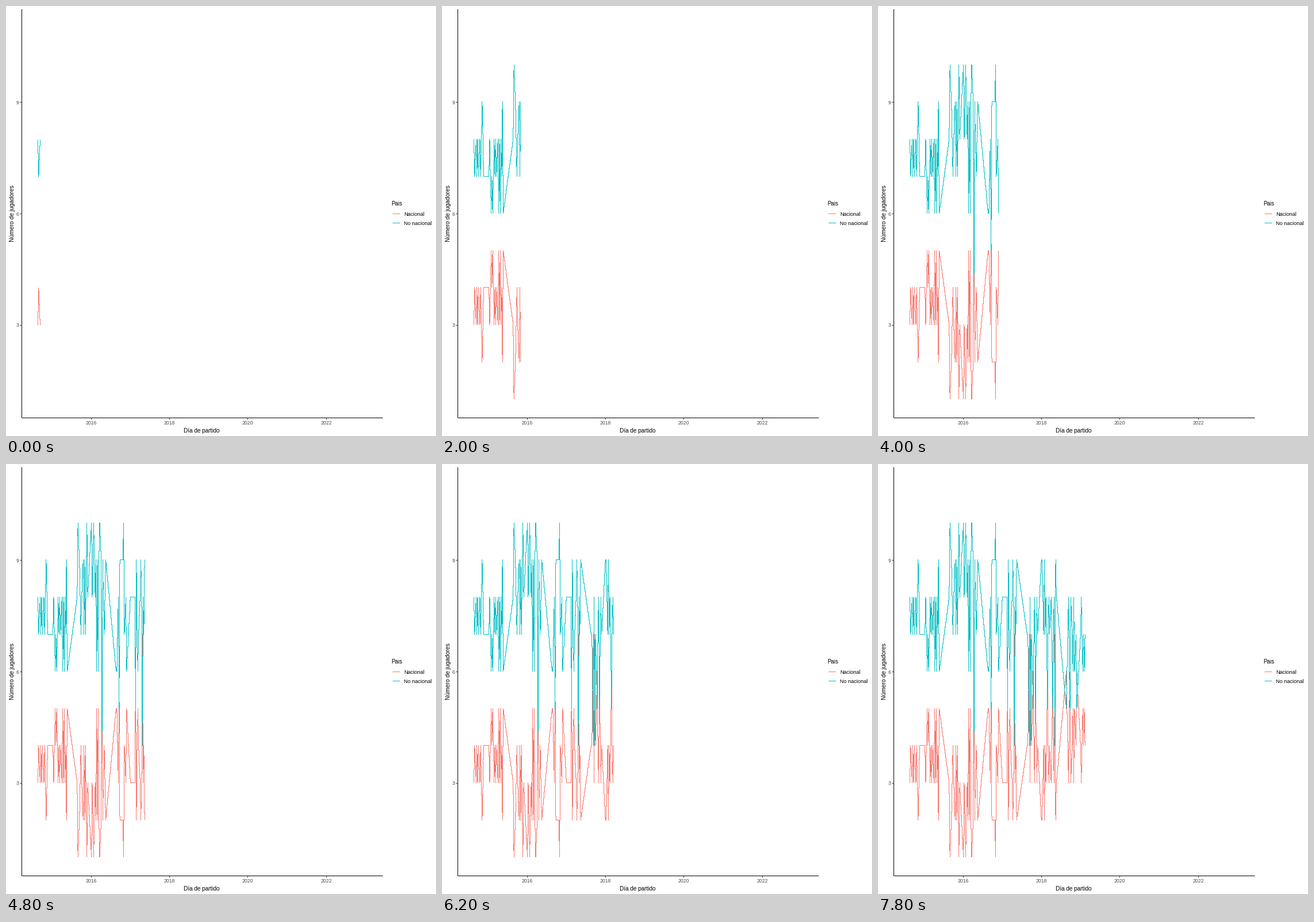
A matplotlib script for the animation above (8000 ms loop, 748 by 748 pixels).

```python
import numpy as np
import matplotlib.pyplot as plt
from matplotlib.animation import FuncAnimation

SIZE, DPI = 748, 100
PX = 72 / DPI                      # points per pixel
RED, TEAL, GREY = "#F8766D", "#00BFC4", "#4D4D4D"
WEEK = 68.15 / 52.18               # pixels per week
X0, STEP = 56.0, 570 / 74          # timeline start, pixels per frame
FRAMES, INTERVAL = 40, 200
IDLE = {2, 7, 12, 31, *range(15, 19)}   # weeks without matches


def row(n):
    """Pixel row of a player count."""
    return 166.8 + 64.61 * (9 - n)


def season(start, last, level, keys):
    """Weekly counts swing between level + 1 and level, except in key weeks."""
    fixed = {w: n for n, weeks in keys.items() for w in weeks}
    weeks = [w for w in range(last + 1) if w not in IDLE]
    return [(start + WEEK * w, fixed.get(w, level + 1 - i % 2))
            for i, w in enumerate(weeks)]


points = [
    *season(55.5, 39, 7, {9: [11, 38], 7: [13, 19], 6: [23, 25, 33, 35, 39]}),
    *season(123.8, 38, 8, {10: [1, 13, 19, 22, 30], 8: [0], 7: [5, 9, 11, 36],
                           6: [26, 28], 4: [33]}),
    *season(191.5, 38, 7, {10: [10], 9: [*range(5, 10), 27, 33, 38],
                           8: range(19, 26), 6: [0, 1, 14, 29],
                           5: [4, 26], 4: [35]}),
    *season(259.4, 39, 7, {9: [19, 20, 23, 38], 8: [4, 39], 7: [0],
                           5: [8, 11, 27, 34], 4: [3, 5, 37]}),
    *season(327.5, 25, 6, {8: [3, 6, 10, 20], 5: [0, 5, 14]}),
]
xs, foreign = np.array(points, float).T
ticks = np.rint((xs - X0) / STEP).astype(int)

plt.rcParams["font.family"] = "Liberation Sans"
fig = plt.figure(figsize=(SIZE / DPI, SIZE / DPI), dpi=DPI, facecolor="white")
ax = fig.add_axes([0, 0, 1, 1])
ax.set_xlim(0, SIZE)
ax.set_ylim(SIZE, 0)
ax.axis("off")


def stroke(x, y, color, **kw):
    return ax.plot(x, y, color=color, lw=PX, solid_capstyle="butt", **kw)[0]


def label(x, y, text, size=8.7, color="black", ha="left", **kw):
    ax.text(x, y, text, fontsize=size * PX, color=color, ha=ha,
            va="baseline", **kw)


def stair(x, y):
    """Trace a polyline through pixel centres, for hard unsmoothed edges."""
    i = np.arange(len(x))
    t = np.linspace(0, i[-1], 120 * i[-1] + 1)
    return [np.floor(np.interp(t, i, v)) + 0.5 for v in (x, y)]


stroke([27.5, 27.5], [5, 716], "black")
stroke([27, 655], [715.5, 715.5], "black")
for n in (3, 6, 9):
    y = int(row(n)) + 0.5
    stroke([24, 27], [y, y], "#333333")
    label(22.5, y + 4, str(n), color=GREY, ha="right")
for i in range(4):
    x = 148 + 136.4 * i
    stroke([int(x) + 0.5] * 2, [716, 719], "#333333")
    label(x, 728, str(2016 + 2 * i), color=GREY, ha="center")
label(340, 741.5, "Día de partido", 10, ha="center")
label(14.5, 361, "Número de jugadores", 10.2, ha="center",
      rotation=90, rotation_mode="anchor")
label(670, 346.5, "Pais", 9.9)
for y, color, name in ((360.5, RED, "Nacional"), (376.5, TEAL, "No nacional")):
    stroke([672, 685], [y, y], color)
    label(692, y + 4, name, 9.1)

home_line, away_line = (
    stroke([], [], c, drawstyle="steps-post", solid_joinstyle="round")
    for c in (RED, TEAL))


def draw(frame):
    k = np.searchsorted(ticks, frame, side="right")
    x, n = xs[:k], foreign[:k]
    # in the summer pause the head glides towards the next season
    if ticks[k - 1] < frame and k < len(xs):
        t = (frame - ticks[k - 1]) / (ticks[k] - ticks[k - 1])
        x = np.append(x, x[-1] + t * (xs[k] - x[-1]))
        n = np.append(n, n[-1] + t * (foreign[k] - n[-1]))
    home_line.set_data(*stair(x, row(11 - n)))
    away_line.set_data(*stair(x, row(n)))
    return home_line, away_line


anim = FuncAnimation(fig, draw, frames=FRAMES, interval=INTERVAL,
                     init_func=lambda: draw(0), repeat=True, repeat_delay=0)
plt.show()
```
